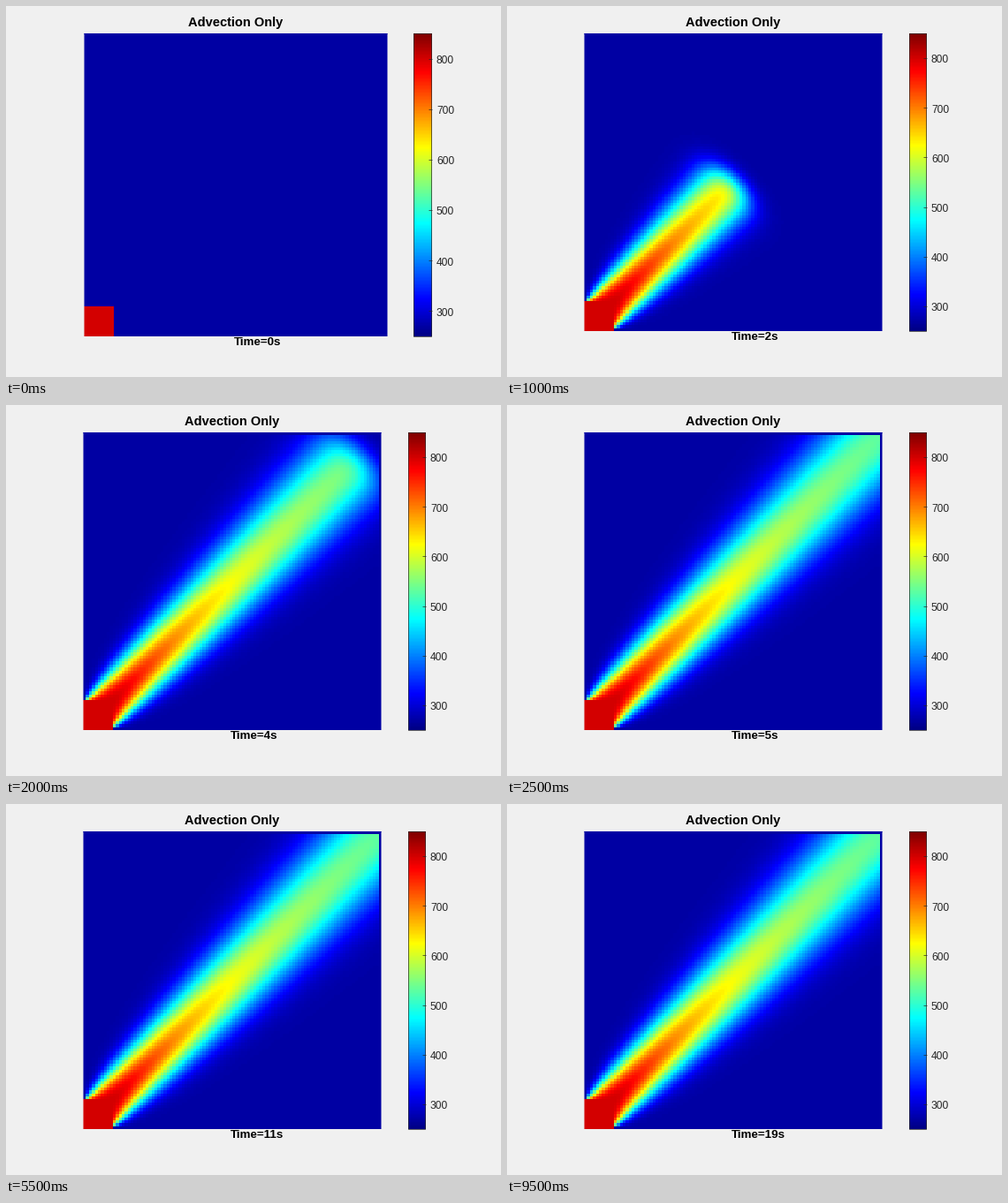
Animation of 560 by 420 pixels, one loop 10000 ms. Source, as a matplotlib script:

```python
import numpy as np
import matplotlib.pyplot as plt
from matplotlib.animation import FuncAnimation
from matplotlib.colors import ListedColormap
from matplotlib.patches import Rectangle

W, H, DPI = 560, 420, 100
N, BLOCK = 100, 10               # grid cells per side, heated corner size
COLD, HOT = 270.0, 800.0
LOW, HIGH = 250, 850
SECONDS, STEPS = 20, 50          # simulated seconds, time steps per second
COURANT = 15 * np.sqrt(2) / STEPS
PAPER, INK = "#f0f0f0", "#262626"


def jet_map():
    i = np.arange(1, 257)

    def ramp(start, end):
        return np.clip(np.minimum(i - start, end - i) / 64, 0, 1)

    return ListedColormap(np.column_stack(
        [ramp(96, 288), ramp(32, 224), ramp(-32, 160)]))


def simulate():
    """First-order upwind advection along the diagonal, one field per second."""
    field = np.full((N, N), COLD)
    field[:BLOCK, :BLOCK] = HOT
    fields = [field.copy()]
    for _ in range(SECONDS - 1):
        for _ in range(STEPS):
            inner = field[1:-1, 1:-1]
            inflow = field[:-2, 1:-1] + field[1:-1, :-2]
            field[1:-1, 1:-1] = inner + COURANT * (inflow - 2 * inner)
            field[:BLOCK, :BLOCK] = HOT
        fields.append(field.copy())
    return fields


fields = simulate()
cmap = jet_map()

fig = plt.figure(figsize=(W / DPI, H / DPI), dpi=DPI, facecolor=PAPER)
ax = fig.add_axes([0, 0, 1, 1])
ax.axis("off")


def label(text, size, color="black", weight="bold", ha="left"):
    return ax.text(0, 0, text, fontsize=size * 72 / DPI, color=color,
                   weight=weight, ha=ha, va="baseline",
                   family="Liberation Sans")


def picture(data):
    return ax.imshow(data, cmap=cmap, vmin=LOW, vmax=HIGH, origin="lower",
                     interpolation="nearest", aspect="auto")


def stroke(color, width, alpha=1):
    return ax.plot([], [], color=color, lw=width, alpha=alpha,
                   solid_capstyle="butt")[0]


heat = picture(fields[0])
bar = picture(np.linspace(LOW, HIGH, 256)[:, None])
soft_edges = [stroke(PAPER, 0.72, 0.5) for _ in range(2)]
frame = ax.add_patch(Rectangle((0, 0), 1, 1, fill=False, ec=INK, lw=0.5))
title = label("Advection Only", 14.67, ha="center")
clock = label("", 13.33)
ticks = [(value, stroke(INK, 0.5), label(str(value), 12, INK, "normal"))
         for value in range(300, 801, 100)]


def arrange(left, right, bottom, bar_left, bar_right):
    top = 31
    heat.set_extent((left, right, bottom, top))
    bar.set_extent((bar_left, bar_right, bottom, top))
    frame.set_bounds(bar_left, top, bar_right - 1 - bar_left, bottom - top)
    for edge, x in zip(soft_edges, (left, right - 1)):
        edge.set_data([x, x], [top, bottom])
    middle = (left + right) / 2
    title.set_position((middle, 23))
    clock.set_position((middle - 2, bottom + 10))
    for value, mark, text in ticks:
        y = bottom - (value - LOW) / (HIGH - LOW) * (bottom - top)
        mark.set_data([bar_right - 4, bar_right], [y, y])
        text.set_position((bar_right + 4.9, y + 5.4))
    ax.set_xlim(0, W)
    ax.set_ylim(H, 0)


def update(second):
    if second == 0:
        arrange(88, 432, 374, 461, 482)
    else:
        # The layout shrinks slightly once the clock has been drawn.
        arrange(87, 425, 368, 455, 475)
    heat.set_data(fields[second])
    clock.set_text(f"Time={second}s")
    return []


animation = FuncAnimation(fig, update, frames=SECONDS, interval=500,
                          repeat=True, repeat_delay=0, blit=False)
plt.show()
```
